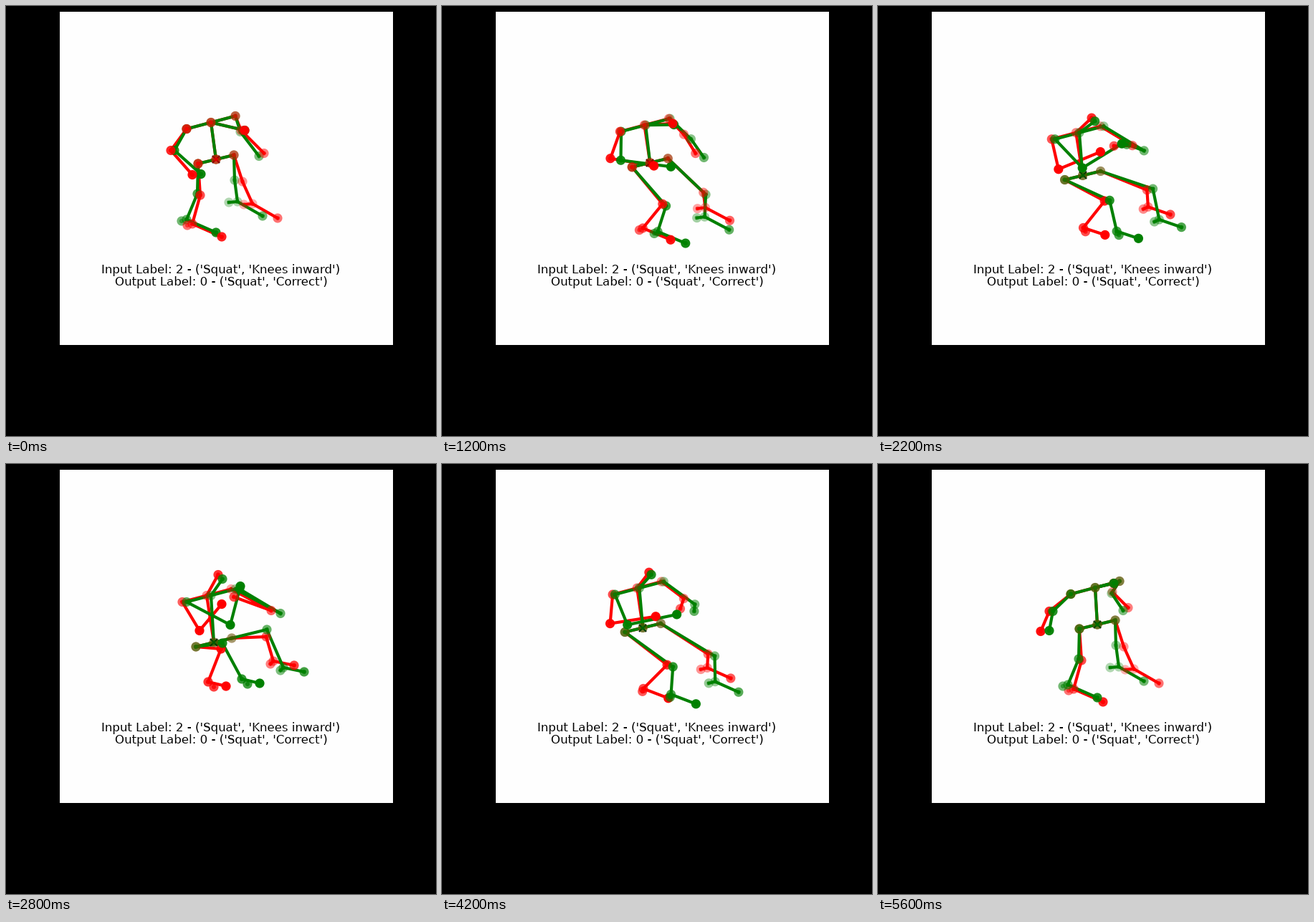
Write a matplotlib script that moves like this. It is 600 px wide and 600 px high and loops after 5700 ms.

```python
import numpy as np
import matplotlib.pyplot as plt
from matplotlib.animation import FuncAnimation
from matplotlib.colors import to_rgb
from matplotlib.patches import Rectangle

plt.rcParams["text.hinting"] = "native"

FRAMES, INTERVAL = 57, 100
KEYS = [0, 7, 17, 28, 36, 48, 56]
CHAINS = [
    "head neck pelvis", "neck l_shoulder l_elbow l_wrist",
    "neck r_shoulder r_elbow r_wrist",
    "pelvis l_hip l_knee l_ankle l_toe",
    "pelvis r_hip r_knee r_ankle r_toe", "r_ankle r_heel",
]
BONES = [pair for c in CHAINS for pair in zip(c.split(), c.split()[1:])]
TRUNK = {"head", "neck", "pelvis", "l_shoulder", "r_shoulder", "l_hip", "r_hip"}
# Opacity by distance from the viewer; far joints are painted first.
SHADE = {
    "r_heel": .3, "r_ankle": .3, "r_knee": .4, "r_elbow": .4,
    "r_shoulder": .5, "r_hip": .5, "r_wrist": .5, "r_toe": .55,
    "l_heel": .55, "l_ankle": .6, "pelvis": .6, "neck": .6,
    "l_hip": .7, "l_knee": .7, "l_shoulder": .78, "l_elbow": .85,
    "l_toe": .88, "head": .95, "l_wrist": .95,
}


def spline(*vals):
    """Cubic Hermite curve through KEYS, sampled once per frame."""
    k, v, t = np.array(KEYS, float), np.array(vals, float), np.arange(FRAMES)
    m = np.gradient(v, k)
    i = np.clip(np.searchsorted(k, t, side="right") - 1, 0, len(k) - 2)
    h = k[i + 1] - k[i]
    u = (t - k[i]) / h
    return ((1 + 2 * u) * (1 - u) ** 2 * v[i] + u * (1 - u) ** 2 * h * m[i]
            + u * u * (3 - 2 * u) * v[i + 1] + u * u * (u - 1) * h * m[i + 1])


def vec(x, y):
    return np.column_stack(np.broadcast_arrays(x, y))


# How low the squat is, and how far the arms have dropped after it.
depth = np.clip(spline(0, .09, .5, 1, .91, .14, 0), 0, 1)
relax = np.clip((np.arange(FRAMES) - 40) / 16, 0, 1)
pelvis = vec(spline(293, 297, 283, 290, 284, 283, 306),
             spline(214, 216, 224, 249, 242, 218, 224))
nod = vec(spline(47, 48, 29, 16, 15, 20, 26), spline(11, 6, -10, -26, -27, -12, -6))

# Quadratic weights of the upright, half-way and low poses.
POSE = np.column_stack([(1 - 2 * depth) * (1 - depth), 4 * depth * (1 - depth),
                        depth * (2 * depth - 1)])
DROP = {"l_elbow": (-8, -6), "l_wrist": (-42, -6),
        "r_elbow": (-18, -5), "r_wrist": (-10, -10)}


def foot(up, low):
    e = depth[:, None] ** 1.5
    return np.array(up) * (1 - e) + np.array(low) * e


def build(lean, limbs):
    """Joint tracks: a rigid trunk with limbs hung on it, bone by bone."""
    j = {"pelvis": pelvis}
    j["neck"] = pelvis + vec(-7 + 4 * relax + lean * depth, -51.5 - 14 * depth ** 2)
    j["head"] = j["neck"] + nod + vec(0, lean * depth)
    for side, s in (("l_", -1), ("r_", 1)):
        j[side + "hip"] = pelvis + vec(s * 25, s * -6)
        j[side + "shoulder"] = j["neck"] + vec(s * 34, s * -9)
    for name, (parent, *poses) in limbs.items():
        drop = np.outer(relax, DROP.get(name, (0, 0)))
        j[name] = j[parent] + POSE @ np.array(poses) + drop
    j["l_heel"] = j["l_ankle"] + foot((-7, 2), (8, 7))
    j["l_toe"] = j["l_ankle"] + foot((41, 18), (25, 6))
    j["r_heel"] = j["r_ankle"] + foot((-12, 1), (-4, 4))
    j["r_toe"] = j["r_ankle"] + foot((35, 20), (29, 6))
    return j


# Each bone as an offset from its parent in the three poses.
red = build(-3, {
    "l_elbow": ("l_shoulder", (-22, 30), (-4, 41), (24, 40)),
    "l_wrist": ("l_elbow", (30, 34), (69, -7), (31, -37)),
    "r_elbow": ("r_shoulder", (8, 20), (32, 24), (56, 30)),
    "r_wrist": ("r_elbow", (32, 32), (-1, 17), (-52, -19)),
    "l_knee": ("l_hip", (3, 44), (58, 47), (35, 3)),
    "l_ankle": ("l_knee", (-11, 40), (-33, 33), (-18, 46)),
    "r_knee": ("r_hip", (12, 37), (65, 44), (48, -2)),
    "r_ankle": ("r_knee", (14, 31), (-1, 19), (10, 34)),
})
green = build(3, {
    "l_elbow": ("l_shoulder", (-17, 30), (16, 43), (61, 32)),
    "l_wrist": ("l_elbow", (37, 33), (75, -11), (14, -54)),
    "r_elbow": ("r_shoulder", (7, 22), (44, 32), (63, 34)),
    "r_wrist": ("r_elbow", (26, 34), (3, 13), (-57, -34)),
    "l_knee": ("l_hip", (-1, 42), (66, 50), (37, -5)),
    "l_ankle": ("l_knee", (-15, 36), (-4, 38), (27, 50)),
    "r_knee": ("r_hip", (1, 35), (74, 47), (49, -12)),
    "r_ankle": ("r_knee", (4, 30), (0, 35), (23, 53)),
})

fig = plt.figure(figsize=(6, 6), dpi=100, facecolor="black")
ax = fig.add_axes([0, 0, 1, 1])
ax.set(xlim=(0, 600), ylim=(600, 0))
ax.axis("off")
ax.add_patch(Rectangle((75, 8), 465, 465, fc="#fefefe", ec="none", zorder=0))
labels = ["Input Label: 2 - ('Squat', 'Knees inward')",
          "Output Label: 0 - ('Squat', 'Correct')"]
for n, label in enumerate(labels):
    ax.text(300, 373 + 17 * n, label, ha="center", va="baseline",
            fontsize=12, family="DejaVu Sans")


def make_body(tracks, color, z):
    line, = ax.plot([], [], color=color, lw=3, zorder=z)
    # A thick edge overlapping the small fill gives the darker core.
    blank = [0] * len(SHADE)
    dots = ax.scatter(blank, blank, s=20, linewidths=5)
    return tracks, to_rgb(color), line, dots


bodies = [make_body(red, "red", 2), make_body(green, "green", 2.1)]
origin, = ax.plot([], [], "x", color="black", ms=7, mew=1.5, zorder=4.5)


def draw(i):
    d = depth[i]
    alpha = [min(1, a + (-.15 if j in TRUNK else .2) * d) for j, a in SHADE.items()]
    red_front = d < .3 and relax[i] < .8
    origin.set_data(*pelvis[i][:, None])
    for n, (tracks, rgb, line, dots) in enumerate(bodies):
        gap = (np.nan, np.nan)
        pts = np.array([p for a, b in BONES for p in (tracks[a][i], tracks[b][i], gap)])
        line.set_data(pts[:, 0], pts[:, 1])
        colors = [(*rgb, a) for a in alpha]
        dots.set_offsets([tracks[j][i] for j in SHADE])
        dots.set_facecolor(colors)
        dots.set_edgecolor(colors)
        dots.set_zorder(5 if (n == 0) == red_front else 4)
    return []


anim = FuncAnimation(fig, draw, frames=FRAMES, interval=INTERVAL,
                     init_func=lambda: draw(0), repeat=True, repeat_delay=0)
plt.show()
```
